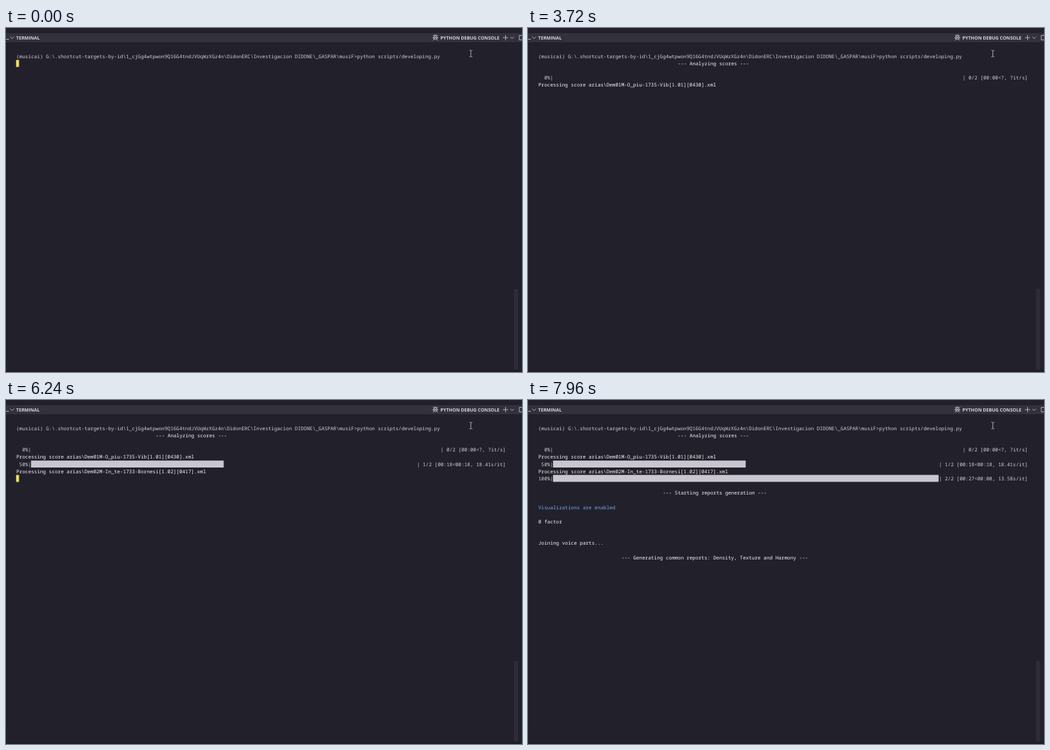
Recreate the animation shown at these times as an HTML page. Size 800 by 535 pixels, loop 8000 ms.

```html
<!DOCTYPE html>
<html lang="en">
<head>
<meta charset="utf-8">
<title>Terminal session</title>
<style>
  html, body { margin: 0; width: 100%; height: 100%; overflow: hidden; background: #22212b; }
  svg { display: block; width: 800px; height: 535px; }
  text { text-rendering: geometricPrecision; white-space: pre; }
  .ui { font: 700 7.1px "Open Sans", "Noto Sans", sans-serif; fill: #d6d4dc; }
  .icon { fill: none; stroke: #c4c2cb; stroke-width: .9; }
  .term { font: 7.667px "Noto Sans Mono", "DejaVu Sans Mono", monospace; fill: #d0ced6; }
  .out { fill: #f4f3f8; }
  .info { fill: #78a5f2; }
  .bar { fill: #cac6cf; }

  /* One loop is 8 s, so 1% is 80 ms */
  .start, .half, .full, .early, .late, .report, .common, .cursor {
    animation: 8s step-end infinite;
  }
  .start { animation-name: start; }
  .half { animation-name: half; }
  .full { animation-name: full; }
  .early { animation-name: early; }
  .late, .report { animation-name: report; }
  .common { animation-name: common; }
  .cursor { animation-name: place, blink; fill: #f4e460; }

  @keyframes start { 0% { opacity: 0 } 4%, to { opacity: 1 } }
  @keyframes half { 0% { opacity: 0 } 62%, to { opacity: 1 } }
  @keyframes full { 0% { opacity: 0 } 88%, to { opacity: 1 } }
  @keyframes early { 0% { opacity: 1 } 90%, to { opacity: 0 } }
  @keyframes report { 0% { opacity: 0 } 90%, to { opacity: 1 } }
  @keyframes common { 0% { opacity: 0 } 91.5%, to { opacity: 1 } }

  @keyframes place {
    0% { transform: translate(15.7px, 49.7px) }
    4% { transform: translate(15.7px, 94.3px) }
    62% { transform: translate(15.7px, 116.6px) }
    88% { transform: translate(774.5px, 116.6px) }
    90% { transform: translate(15.7px, 228.3px) }
    91.5%, to { transform: translate(15.7px, 250.7px) }
  }
  @keyframes blink {
    0%, 19%, 34%, 49%, 61.5%, 76.5%, 88% { opacity: 1 }
    11.5%, 26.5%, 41.5%, 56.5%, 69%, 84%, 99%, to { opacity: 0 }
  }
</style>
</head>
<body>
<svg viewBox="0 0 800 535">
  <rect width="800" height="535" fill="#22212b"/>
  <rect y="8" width="800" height="14" fill="#32313c"/>
  <path d="M2.5 22V517" stroke="#1d1c25"/>
  <rect y="533" width="800" height="2" fill="#1d1c25"/>
  <rect x="787.5" y="406" width="6.5" height="125" fill="#2d2c37"/>

  <g class="ui">
    <text x="15.8" y="17.6">TERMINAL</text>
    <text x="673.6" y="17.6">PYTHON DEBUG CONSOLE</text>
  </g>
  <g class="icon">
    <path d="M0 17.5H4.5M6.5 13.5L9.5 16.5L12.5 13.5"/>
    <path d="M770.5 15H778.5M774.5 11V19M782 13.8L784.7 16.4L787.4 13.8"/>
    <path d="M800 11.5H795.8V18.5H800"/>
    <circle cx="665.7" cy="15.2" r="2.8"/>
    <path d="M661 15.2H670.4M661.8 11.2L664 13.2M669.6 11.2L667.4 13.2M661.8 19.2L664 17.2M669.6 19.2L667.4 17.2M664 12.5V11H667.4V12.5M664.2 13.7L667.2 16.7M667.2 13.7L664.2 16.7"/>
    <path d="M718.5 34.8H720L720.7 35.5L721.4 34.8H723M720.7 35.5V44M718.5 44.7H720L720.7 44L721.4 44.7H723"/>
  </g>

  <g class="term">
    <text x="16" y="46.6">(musicai) G:\.shortcut-targets-by-id\1_cjGg4wtpwon9Q16G4tndJVUqWzXGz4n\DidonERC\Investigacion DIDONE\_GASPAR\musiF&gt;python scripts/developing.py</text>

    <g class="start">
      <text class="out" x="232.2" y="57.8">--- Analyzing scores ---</text>
      <text x="25.2" y="80.1">0%|</text>
      <text x="673.8" y="80.1">| 0/2 [00:00&lt;?, ?it/s]</text>
      <text class="out" x="16" y="91.3">Processing score arias\Dem01M-O_piu-1735-Vib[1.01][0430].xml</text>
    </g>

    <g class="half">
      <text x="20.6" y="102.5">50%|</text>
      <rect class="bar" x="38.8" y="94.2" width="298.7" height="10.8"/>
      <text x="637" y="102.5">| 1/2 [00:18&lt;00:18, 18.41s/it]</text>
      <text class="out" x="16" y="113.6">Processing score arias\Dem02M-In_te-1733-Bornesi[1.02][0417].xml</text>
    </g>

    <g class="full">
      <text x="16" y="124.8">100%|</text>
      <rect class="bar" x="38.8" y="116.5" width="597.8" height="10.8"/>
      <text class="early" x="637" y="124.8">| 2/2 [00:27&lt;00:00, 12.73s/it]</text>
      <text class="late" x="637" y="124.8">| 2/2 [00:27&lt;00:00, 13.58s/it]</text>
    </g>

    <g class="report">
      <text class="out" x="209.2" y="147.1">--- Starting reports generation ---</text>
      <text class="info" x="16" y="169.5">Visualizations are enabled</text>
      <text class="out" x="16" y="191.8">0 factor</text>
      <text class="out" x="16" y="225.3">Joining voice parts...</text>
    </g>
    <text class="out common" x="144.8" y="247.7">--- Generating common reports: Density, Texture and Harmony ---</text>
  </g>

  <rect class="cursor" width="4.4" height="10.8"/>
</svg>
</body>
</html>
```
